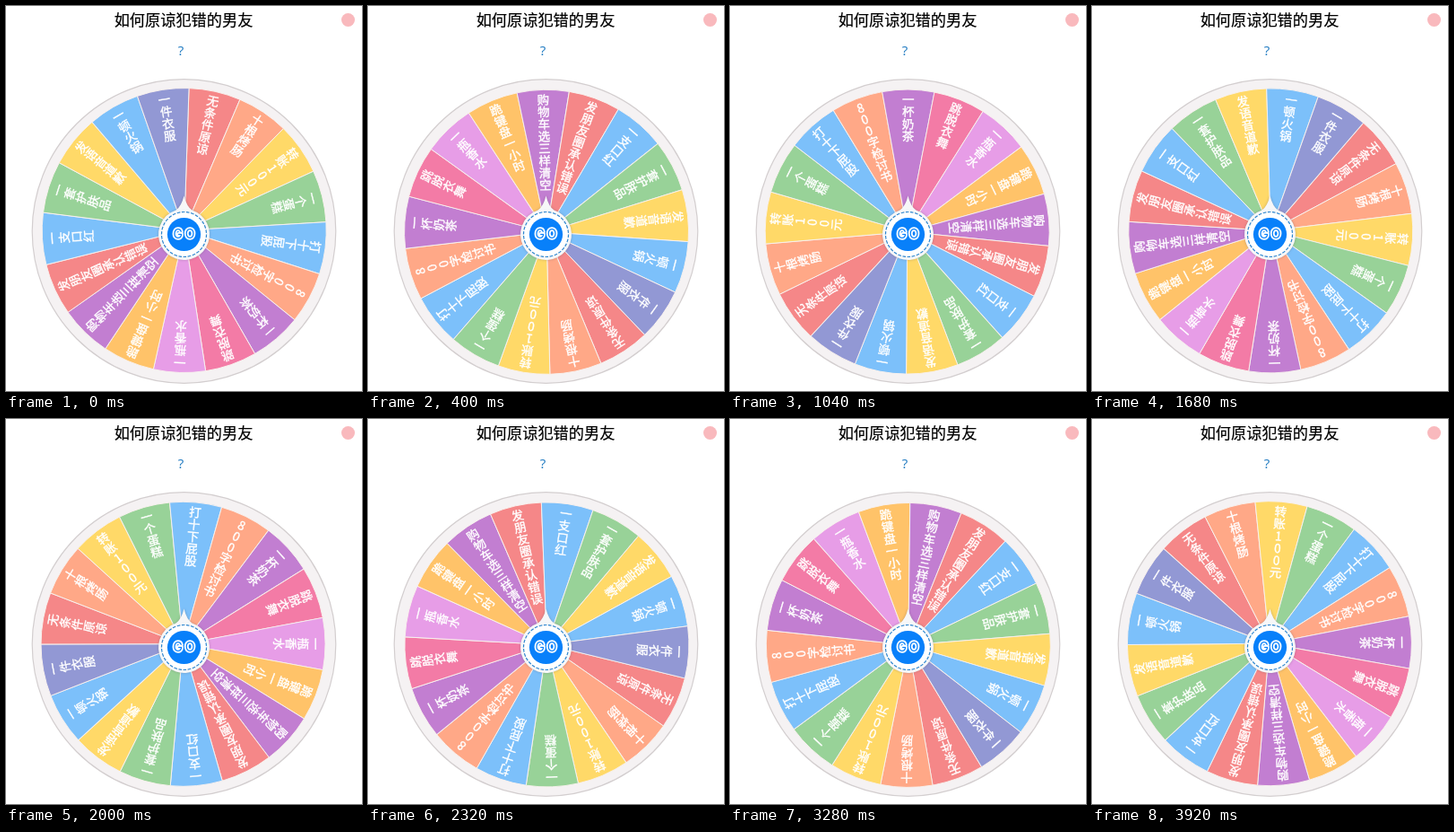
Animation, 397 px wide and 429 px high, one loop 4000 ms. Source, as an HTML page with a canvas:

```html
<!DOCTYPE html>
<html lang="zh-CN">
<head>
<meta charset="utf-8">
<title>如何原谅犯错的男友</title>
<style>
  html, body { margin: 0; width: 397px; height: 429px; overflow: hidden; background: #fff; }
  canvas { display: block; }
</style>
</head>
<body>
<canvas id="stage" width="397" height="429"></canvas>
<script>
const ctx = document.getElementById('stage').getContext('2d');
const CJK = '"Noto Sans CJK SC", "Noto Sans CJK", sans-serif';
const RED = '#f58788', SALMON = '#ffa887', YELLOW = '#ffd968', GREEN = '#98d298',
  BLUE = '#7cc0fa', PURPLE = '#c27ed1', PINK = '#f37ba6', LILAC = '#e79de7',
  ORANGE = '#ffc369', INDIGO = '#9298d4', ACCENT = '#0880fa';

const sectors = [
  ['无条件原谅', RED], ['十根烤肠', SALMON], ['转账100元', YELLOW],
  ['一个蛋糕', GREEN], ['打十下屁股', BLUE], ['800字检讨书', SALMON],
  ['一杯奶茶', PURPLE], ['跳脱衣舞', PINK], ['一瓶香水', LILAC],
  ['跪键盘一小时', ORANGE], ['购物车选三样清空', PURPLE], ['发朋友圈承认错误', RED],
  ['一支口红', BLUE], ['一套护肤品', GREEN], ['发语音道歉', YELLOW],
  ['一顿火锅', BLUE], ['一件衣服', INDIGO],
];
const STEP = 2 * Math.PI / sectors.length;
const LOOP = 4000, TICK = 80;
const SPIN = 109 * STEP, SPIN_TIME = 6080, LEAD = 74;
const TILT = -0.007; // the wheel rests slightly anticlockwise of upright

// The standard "ease" curve, cubic-bezier(.25, .1, .25, 1)
function ease(x) {
  let lo = 0, hi = 1;
  for (let i = 0; i < 30; i++) {
    const s = (lo + hi) / 2;
    if (0.75 * s - 0.75 * s * s + s ** 3 < x) lo = s; else hi = s;
  }
  return 0.3 * lo + 2.4 * lo * lo - 1.7 * lo ** 3;
}

function disc(x, y, r, fill, stroke, width = 1) {
  ctx.beginPath();
  ctx.arc(x, y, r, 0, 2 * Math.PI);
  if (fill) { ctx.fillStyle = fill; ctx.fill(); }
  if (stroke) { ctx.strokeStyle = stroke; ctx.lineWidth = width; ctx.stroke(); }
}

// A thin stroke of the same colour gives a medium weight
function label(text, x, y, font, color, weight = 0) {
  ctx.font = font;
  ctx.fillStyle = ctx.strokeStyle = color;
  ctx.fillText(text, x, y);
  if (weight) {
    ctx.lineWidth = weight;
    ctx.strokeText(text, x, y);
  }
}

function drawWheel(angle) {
  disc(198.5, 251, 169.3, '#f5f2f3', '#d3cecf', 1.2);
  ctx.save();
  ctx.translate(198.5, 251);
  ctx.rotate(angle + TILT);
  ctx.translate(0, -1); // the face sits a little off the axle
  for (const [text, color] of sectors) {
    ctx.beginPath();
    ctx.moveTo(0, 0);
    ctx.arc(0, 0, 158.5, -Math.PI / 2 - STEP / 2, -Math.PI / 2 + STEP / 2);
    ctx.closePath();
    ctx.fillStyle = color;
    ctx.fill();
    ctx.strokeStyle = '#f8f1ee';
    ctx.lineWidth = 0.9;
    ctx.stroke();
    [...text].forEach((char, i) =>
      label(char, 0, -147.5 + i * 13.6, '13.5px ' + CJK, '#fff', 0.4));
    ctx.rotate(STEP);
  }
  ctx.restore();
}

function drawHub() {
  ctx.save();
  ctx.translate(198.5, 254.5);
  ctx.shadowColor = 'rgba(90, 80, 90, .35)';
  ctx.shadowBlur = 3;
  ctx.beginPath();
  ctx.moveTo(0, -43);
  ctx.quadraticCurveTo(3, -31, 9, -27);
  ctx.arc(0, 0, 28.5, -1.25, Math.PI + 1.25);
  ctx.quadraticCurveTo(-3, -31, 0, -43);
  ctx.fillStyle = '#f7f7f8';
  ctx.fill();
  ctx.shadowBlur = 0;
  ctx.setLineDash([3.6, 1.6]);
  disc(0, 0, 25, '#fff', '#2d86cf', 1.2);
  ctx.setLineDash([]);
  disc(0, 0, 18.6, ACCENT);
  ctx.letterSpacing = '3px';
  ctx.lineJoin = 'round';
  label('GO', 1.5, 0.3, '14px Inter, sans-serif', '#fff', 3.6);
  label('GO', 1.5, 0.3, '14px Inter, sans-serif', ACCENT);
  ctx.restore();
}

function draw() {
  const time = Math.floor(performance.now() % LOOP / TICK) * TICK;
  ctx.fillStyle = '#fff';
  ctx.fillRect(0, 0, 397, 429);
  ctx.textAlign = 'center';
  ctx.textBaseline = 'middle';
  label('如何原谅犯错的男友', 198, 15, '17.2px ' + CJK, '#000', 0.2);
  label('?', 195, 50.5, '15px "Noto Sans", sans-serif', '#2a80c4');
  disc(381.5, 15.5, 7.5, '#f9b9bd');
  drawWheel(SPIN * ease((time + LEAD) / SPIN_TIME));
  drawHub();
  requestAnimationFrame(draw);
}
draw();
</script>
</body>
</html>
```
